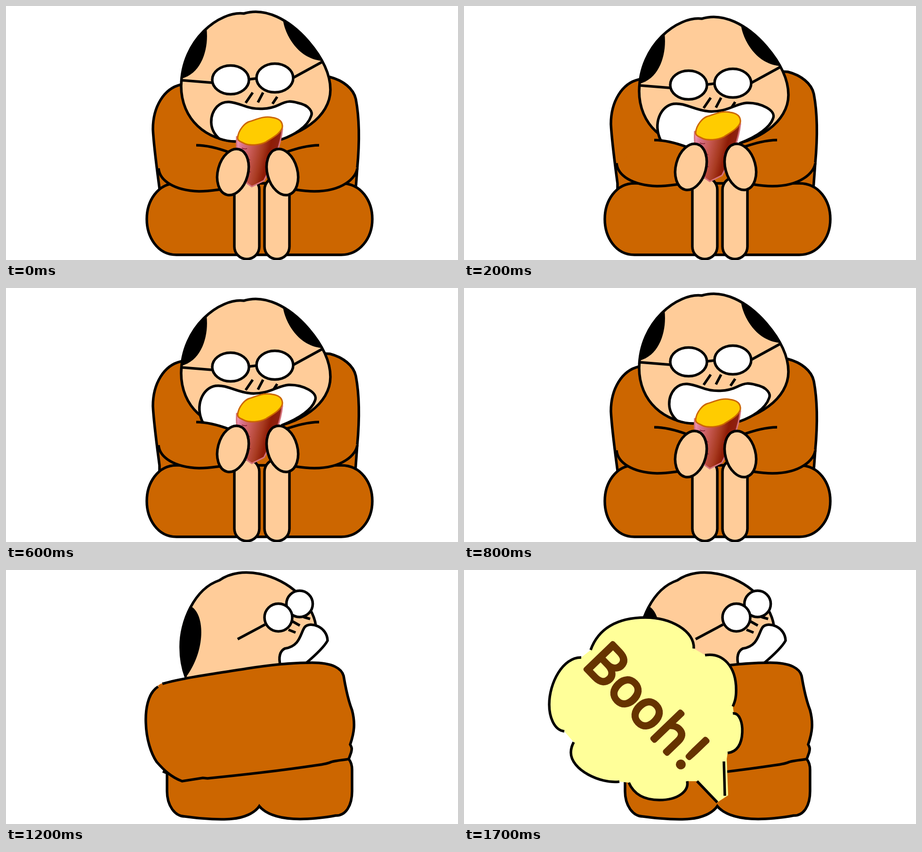
Animation of 960 by 540 pixels, one loop 2200 ms. Source, as an HTML page:

```html
<!DOCTYPE html>
<html lang="en">
<head>
<meta charset="utf-8">
<title>Sweet potato</title>
<style>
  html, body { margin: 0; width: 100%; height: 100%; overflow: hidden; background: #fff; }
  svg { display: block; width: 960px; height: 540px; }
  .line { fill: none; stroke: #000; stroke-width: 5.5; }
  .skin { fill: #fc9; }
  .robe { fill: #c60; }
  .white { fill: #fff; }
  .edge { stroke: #000; stroke-width: 5.5; }
  #back, #cloud, #wide { opacity: 0; }
  text { font: 300 112px Lato, "Open Sans", sans-serif; fill: #630; stroke: #630; stroke-width: 10.5; stroke-linejoin: round; }
</style>
</head>
<body>
<svg viewBox="0 0 960 540">
  <defs>
    <path id="skull" d="M505 16C455 10 373 70 372 170C372 240 425 288 495 288L545 288C625 280 689 235 689 178C689 145 672 110 642 75C601 28 550 2 505 16Z"/>
    <clipPath id="inSkull"><use href="#skull"/></clipPath>
    <linearGradient id="peel" gradientUnits="userSpaceOnUse" x1="487" y1="300" x2="580" y2="322">
      <stop offset="0" stop-color="#f09ab8"/>
      <stop offset=".15" stop-color="#d97088"/>
      <stop offset=".35" stop-color="#c85a55"/>
      <stop offset=".6" stop-color="#a83a20"/>
      <stop offset=".75" stop-color="#8e1c06"/>
      <stop offset=".9" stop-color="#8e2010"/>
      <stop offset="1" stop-color="#b04a40"/>
    </linearGradient>
  </defs>

  <g id="front">
    <g class="rise">
      <path class="robe edge" d="M326 400V388C321 350 314 300 312 262C312 215 335 175 372 167L500 140L688 151C715 158 738 175 743 198C750 235 752 280 746 345L742 400Z"/>
    </g>

    <g id="head">
      <use href="#skull" class="skin"/>
      <g clip-path="url(#inSkull)">
        <path d="M426 48C431 90 416 145 370 155L350 60Z"/>
        <path d="M588 28C592 60 620 115 676 117L690 20Z"/>
      </g>
      <use href="#skull" class="line"/>
      <path class="line" d="M375 158L437 163M515 156L532 154M611 152L673 118M524 184L509 206M546 184L535 205M576 193L566 208"/>
      <ellipse class="white edge" cx="477" cy="157" rx="39" ry="30.5"/>
      <ellipse class="white edge" cx="571" cy="153" rx="39" ry="30.5"/>
      <path id="small" class="white edge" d="M453 282C430 262 432 232 448 214C464 198 482 204 505 212C530 222 560 220 580 210C598 201 605 202 620 206C645 211 652 226 648 234C640 258 610 275 587 283C560 288 510 289 487 288Q470 288 453 282Z"/>
      <g id="wide">
        <path class="white" d="M418 275C400 239 418 201 445 197C470 194 490 211 520 213C560 215 575 197 600 195C630 194 665 211 656 229C650 246 625 266 585 281V294H470Z"/>
        <path class="line" d="M418 275C400 239 418 201 445 197C470 194 490 211 520 213C560 215 575 197 600 195C630 194 665 211 656 229C650 246 625 266 585 281"/>
      </g>
    </g>

    <path class="robe edge" d="M362 377H712C755 377 778 415 778 453C778 495 750 529 712 529H362C321 529 299 490 299 453C299 415 322 377 362 377Z"/>

    <g class="rise">
      <path class="robe" d="M404 296C430 296 455 304 474 311L490 340L455 390C440 392 430 394 410 394C355 392 326 370 324 345Z"/>
      <path class="robe" d="M665 296C640 296 615 304 596 310L580 340L612 390C625 392 640 394 655 394C715 394 744 365 746 345Z"/>
      <path class="line" d="M404 296C430 296 455 304 474 311M455 390C440 392 430 394 410 394C355 392 326 370 324 345M665 296C640 296 615 304 596 310M612 390C625 392 640 394 655 394C715 394 744 365 746 345"/>
    </g>

    <rect class="skin edge" x="485" y="364" width="53" height="174" rx="26.5"/>
    <rect class="skin edge" x="549" y="364" width="53" height="174" rx="26.5"/>

    <g class="rise">
      <path fill="url(#peel)" stroke="#d4727c" stroke-width="3" d="M490 278C488 310 495 345 512 377L522 384L548 371C565 340 583 300 587 262Z"/>
      <path fill="#fc0" stroke="#c60" stroke-width="3" d="M492 280C494 262 508 249 516 246C533 241 548 233 565 237C580 239 588 246 587 258C583 272 562 282 552 289C538 296 518 297 508 293C498 288 492 287 492 280Z"/>
      <path fill="none" stroke="#823" stroke-width="1.5" d="M501 302Q507 305 512 303M515 325L519 328M515 352L520 353M550 326L555 328"/>
      <ellipse class="skin edge" rx="32" ry="50" transform="translate(482 353) rotate(15)"/>
      <ellipse class="skin edge" rx="32" ry="50" transform="translate(587 353) rotate(-15)"/>
    </g>
  </g>

  <g id="back">
    <path class="skin" d="M382 228C376 212 371 190 371 165C370 110 400 40 453 22C500 -12 580 10 620 50C640 70 655 95 658 118L620 200L382 240Z"/>
    <path d="M394 78C422 95 425 170 382 228C367 190 367 135 394 78Z"/>
    <path class="line" d="M382 228C376 212 371 190 371 165C370 110 400 40 453 22C500 -12 580 10 620 50C640 70 655 95 658 118"/>
    <path class="white edge" d="M583 204C578 185 582 172 592 167C625 162 625 135 634 122C645 108 682 120 683 150C675 165 655 183 636 199"/>
    <circle class="white edge" cx="623.5" cy="72" r="28"/>
    <circle class="white edge" cx="578.5" cy="101" r="29.5"/>
    <path class="line" d="M492 147L550 116M608 109L624 118M600 127L615 133M632 100L646 104"/>
    <path class="robe edge" d="M342 425V470C342 500 358 524 380 524C420 530 460 531 480 529C505 527 528 517 538 502C550 517 575 527 610 529C640 531 680 526 700 522C722 523 735 500 735 470V425C735 415 733 408 728 402"/>
    <path class="line" d="M333 428L342 432"/>
    <path class="robe edge" d="M332 242C380 228 460 218 515 209C560 202 610 197 650 197C695 197 713 210 717 225C722 255 728 280 735 298C742 325 740 345 731 371C735 378 735 380 733 388L728 402C715 404 700 405 691 408C685 411 675 413 660 415C600 424 510 435 428 443L418 442L374 449C350 440 335 425 320 408C308 390 298 360 297 325C296 300 300 262 323 248"/>
    <path d="M324 248L332 243" stroke="#c60" stroke-width="5.5"/>
  </g>

  <g id="cloud">
    <path fill="#ff9" d="M269 170C285 125 325 101 385 101C440 101 490 130 488 167L512 181C550 175 578 205 578 255C578 275 574 283 571 290L573 304C585 303 592 325 591 345C590 370 580 387 560 389L558 402L561 479L538 494L495 449H473C478 470 455 489 415 489C380 489 360 475 350 452L330 450C290 455 227 425 227 388C227 378 230 372 233 366L213 343C190 340 181 310 181 286C181 240 210 185 249 186Z"/>
    <path class="line" d="M269 170C285 125 325 101 385 101C440 101 490 130 488 167M512 181C550 175 578 205 578 255C578 275 574 283 571 290M571 305C585 303 592 325 591 345C590 370 580 387 560 389M552 407L554 480M538 494L495 449M474 449C478 470 455 489 415 489C380 489 360 475 350 452M330 450C290 455 227 425 227 388C227 378 230 372 233 366M213 343C190 340 181 310 181 286C181 240 210 185 249 186"/>
    <text transform="translate(262 210) rotate(46)" x="-13 61 126 194 270" y="3">Booh!</text>
  </g>
</svg>
<script>
  const LOOP = 2200, BITE = 200, TURN = 1200, SHOUT = 1700;

  // Each step is [start in ms, value], held until the next one.
  function play(selector, prop, steps) {
    const frames = [...steps, [LOOP, steps[steps.length - 1][1]]].map(([t, v]) =>
      ({ offset: t / LOOP, [prop]: v, easing: 'steps(1, end)' }));
    for (const el of document.querySelectorAll(selector)) {
      el.animate(frames, { duration: LOOP, iterations: Infinity }).startTime = 0;
    }
  }

  const chew = (open, bite) => Array.from({ length: TURN / BITE }, (_, i) =>
    [i * BITE, i % 2 ? bite : open]);
  const shift = y => `translate(0px, ${y}px)`;

  play('.rise', 'transform', chew(shift(0), shift(-11)));
  play('#head', 'transform', chew(shift(0), shift(11)));
  play('#small', 'opacity', chew(1, 0));
  play('#wide', 'opacity', chew(0, 1));
  play('#front', 'opacity', [[0, 1], [TURN, 0]]);
  play('#back', 'opacity', [[0, 0], [TURN, 1]]);
  play('#cloud', 'opacity', [[0, 0], [SHOUT, 1]]);
</script>
</body>
</html>
```
